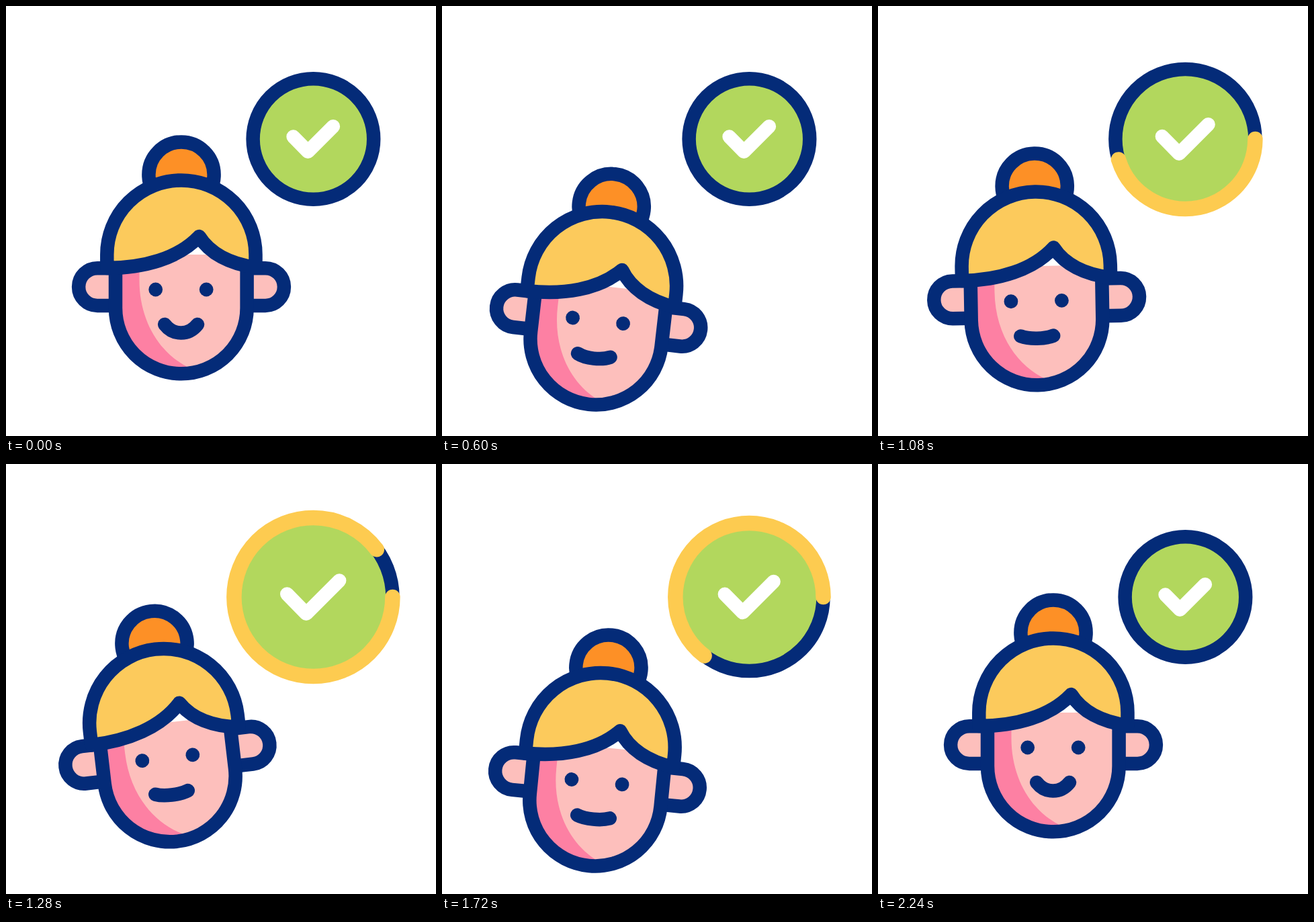
An HTML page that plays this animation: 640 by 640 pixels, repeating every 2400 ms.

```html
<!DOCTYPE html>
<html lang="en">
<head>
<meta charset="utf-8">
<title>Approved</title>
<style>
  html, body { margin: 0; width: 100%; height: 100%; overflow: hidden; background: #fff; }
  svg { display: block; width: 100%; height: 100%; }
  .line { stroke: #042b78; stroke-width: 20.5; stroke-linejoin: round; }
  .round { stroke-linecap: round; }
  .open { fill: none; }
  .skin { fill: #fdbfbc; }
</style>
</head>
<body>
<svg viewBox="0 0 640 640">
  <g id="head">
    <circle class="line" cx="261" cy="251" r="48.6" fill="#fd9026"/>
    <path class="line skin" d="M163 390.2H136a27.9 27.9 0 0 0 0 55.8H163"/>
    <path class="line skin" d="M359 390.2H386a27.9 27.9 0 0 1 0 55.8H359"/>
    <path class="skin" d="M163 370V449.5a97.8 97.8 0 0 0 195.6 0V370Z"/>
    <path fill="#fd80a3" d="M163 380H198.5V408C198.5 470 230 519 274 539L261 547A97.8 97.8 0 0 1 163 449.5Z"/>
    <path class="line open" d="M163 390V449.5a97.8 97.8 0 0 0 195.6 0V390"/>
    <path class="line" fill="#fcca5c"
      d="M150.3 390V370a110.6 110.6 0 0 1 221.2 0V389C333 384 303 368 287.5 343C256 376 205 390 150.3 390Z"/>
    <g fill="#042b78">
      <circle cx="222.7" cy="422" r="10.4"/>
      <circle cx="298.2" cy="422" r="10.4"/>
    </g>
    <path id="mouth" class="line round open"/>
  </g>
  <g transform="translate(457.4 198)">
    <circle id="badge" class="line" fill="#b2d75d"/>
    <circle id="progress" class="round open" stroke="#fdcb50" stroke-width="22.5" pathLength="360"/>
    <path id="check" class="round open" stroke="#fff" stroke-width="20.5" stroke-linejoin="round"/>
  </g>
</svg>
<script>
  const LOOP = 2400;
  const PIVOT = [261, 375];
  const RADIUS = 89.8;
  const CHECK = [[-29.8, -3.4], [-8, 18.8], [29.5, -18.7]];

  // Keys are [time in ms, value]
  const MOVE_X = [[200, 0], [700, -25.6], [1690, -25.6], [2200, 0]];
  const MOVE_Y = [[200, 0], [700, 52], [1190, 12], [1690, 52], [2233, 0]];
  const TILT = [[200, 0], [750, 8], [1333, -7], [1850, 8], [2233, 0]];
  const SMILE = [[200, 12.5], [700, 3.7], [1750, 3.7], [2233, 12.5]];
  const SCALE = [[800, 1], [1400, 1.35], [2200, 1]];
  const ARC_END = [[800, 0], [1400, 360]];
  const ARC_START = [[1400, 0], [2200, 360]];

  const [head, mouth, badge, progress, check] =
    ["head", "mouth", "badge", "progress", "check"].map(id => document.getElementById(id));

  const ease = u => u * u * (3 - 2 * u);

  function at(keys, t) {
    if (t <= keys[0][0]) return keys[0][1];
    for (let i = 1; i < keys.length; i++) {
      const [t0, v0] = keys[i - 1], [t1, v1] = keys[i];
      if (t < t1) return v0 + (v1 - v0) * ease((t - t0) / (t1 - t0));
    }
    return keys[keys.length - 1][1];
  }

  function render(t) {
    head.setAttribute("transform",
      `translate(${at(MOVE_X, t)} ${at(MOVE_Y, t)}) rotate(${at(TILT, t)} ${PIVOT})`);
    const curve = 474 + at(SMILE, t) / 0.75;
    mouth.setAttribute("d", `M236.2 474C249 ${curve} 272 ${curve} 285 474`);

    const scale = at(SCALE, t);
    badge.setAttribute("r", RADIUS * scale);
    progress.setAttribute("r", RADIUS * scale);
    check.setAttribute("d", "M" + CHECK.map(([x, y]) => `${x * scale} ${y * scale}`).join("L"));

    const start = at(ARC_START, t);
    const length = at(ARC_END, t) - start;
    progress.setAttribute("visibility", length > 0 ? "visible" : "hidden");
    progress.setAttribute("stroke-dasharray", `${length} 720`);
    progress.setAttribute("stroke-dashoffset", -start);
  }

  const origin = performance.now();
  function tick() {
    render((performance.now() - origin) % LOOP);
    requestAnimationFrame(tick);
  }
  render(0);
  requestAnimationFrame(tick);
</script>
</body>
</html>
```
